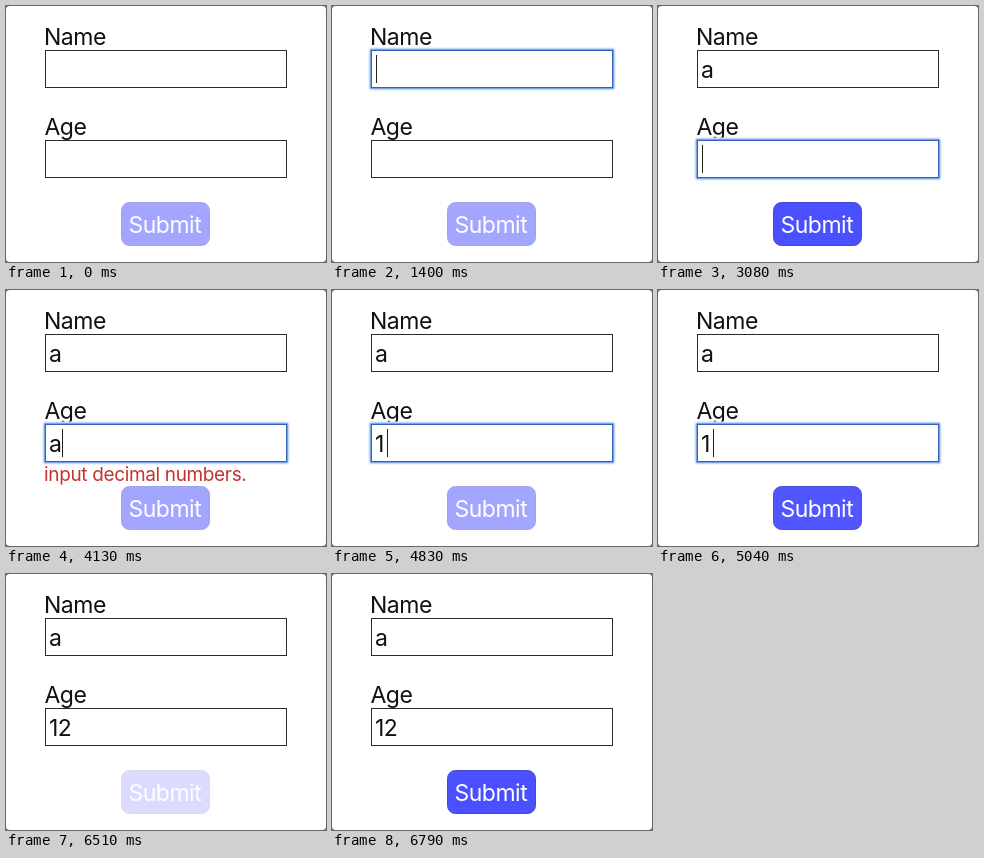
These frames come from a looping animation (320 px wide and 256 px high, 7560 ms). An HTML page:

```html
<!DOCTYPE html>
<html lang="en">
<head>
<meta charset="utf-8">
<title>Form validation</title>
<style>
  html, body { margin: 0; width: 100%; height: 100%; overflow: hidden; background: #777; }
  svg { display: block; width: 320px; height: 256px; }
  text { font: 23px Inter, "Liberation Sans", sans-serif; letter-spacing: -.5px; fill: #111; }
  .field { fill: #fff; stroke: #2b2b2b; stroke-width: 1; }
  .ring rect { fill: none; }
  .caret { fill: #222; }
  #error { font-size: 19px; letter-spacing: -.35px; fill: #c5332d; }
  #submit text { fill: #fff; }
</style>
</head>
<body>
<svg viewBox="0 0 320 256">
  <defs>
    <g id="ring" class="ring">
      <rect x="37.5" y="42.5" width="245" height="41" rx="2" stroke="#dbe7fa" stroke-width="2"/>
      <rect x="38.5" y="43.5" width="243" height="39" rx="1" stroke="#7ba4e8" stroke-width="1.5"/>
      <rect x="39.5" y="44.5" width="241" height="37" stroke="#2e62bd"/>
    </g>
  </defs>
  <rect width="320" height="256" rx="4" fill="#fff"/>

  <text x="38" y="39">Name</text>
  <rect class="field" x="39.5" y="44.5" width="241" height="37"/>
  <use id="nameRing" href="#ring"/>
  <text id="name" x="43" y="72"></text>
  <rect id="nameCaret" class="caret" y="49" width="1" height="28"/>

  <text x="38.5" y="129">Age</text>
  <rect class="field" x="39.5" y="134.5" width="241" height="37"/>
  <use id="ageRing" href="#ring" y="90"/>
  <text id="age" x="43" y="162"></text>
  <rect id="ageCaret" class="caret" y="139" width="1" height="28"/>

  <text id="error" x="38" y="191"></text>
  <g id="submit">
    <rect x="115.5" y="196.5" width="88" height="43" rx="8" fill="#4a50ff" stroke="#444acb"/>
    <text x="122.5" y="227">Submit</text>
  </g>
</svg>
<script>
const LOOP = 7560, FADE = 300;
const get = id => document.getElementById(id);

// Each track lists [start time, value]; a value holds until the next start.
const nameText = [[0, ""], [2030, "a"]];
const ageText = [[0, ""], [3500, "a"], [4410, ""], [4760, "1"], [5600, "12"]];
const errorText = [[0, ""], [3570, "input decimal numbers."], [4410, "input numbers."], [4830, ""]];
const focus = [[0, ""], [1400, "name"], [3080, "age"], [6510, ""]];
const caretOn = [[0, true], [4270, false], [4410, true], [5460, false], [5600, true], [6160, false]];
const caretX = { "": 44, a: 56, "1": 55, "12": 69 };

// Button opacity fades: [start, from, to].
const fades = [[0, .5, .5], [2000, .5, 1], [3570, 1, .5], [4850, .5, 1], [6510, .2, 1]];

const entryAt = (track, t) => track.findLast(entry => entry[0] <= t);
const valueAt = (track, t) => entryAt(track, t)[1];

function opacityAt(t) {
  const [start, from, to] = entryAt(fades, t);
  const p = Math.min((t - start) / FADE, 1);
  return from + (to - from) * (1 - (1 - p) ** 2.5);
}

function show(id, visible) {
  get(id).style.display = visible ? "" : "none";
}

function drawField(id, text, t) {
  const focused = valueAt(focus, t) === id;
  get(id).textContent = text;
  get(id + "Caret").setAttribute("x", caretX[text]);
  show(id + "Ring", focused);
  show(id + "Caret", focused && valueAt(caretOn, t));
}

function draw(now) {
  const t = now % LOOP;
  drawField("name", valueAt(nameText, t), t);
  drawField("age", valueAt(ageText, t), t);
  get("error").textContent = valueAt(errorText, t);
  get("submit").setAttribute("opacity", opacityAt(t));
}

let origin;
function tick(now) {
  origin ??= now;
  draw(Math.max(0, now - origin));
  requestAnimationFrame(tick);
}
draw(0);
requestAnimationFrame(tick);
</script>
</body>
</html>
```
